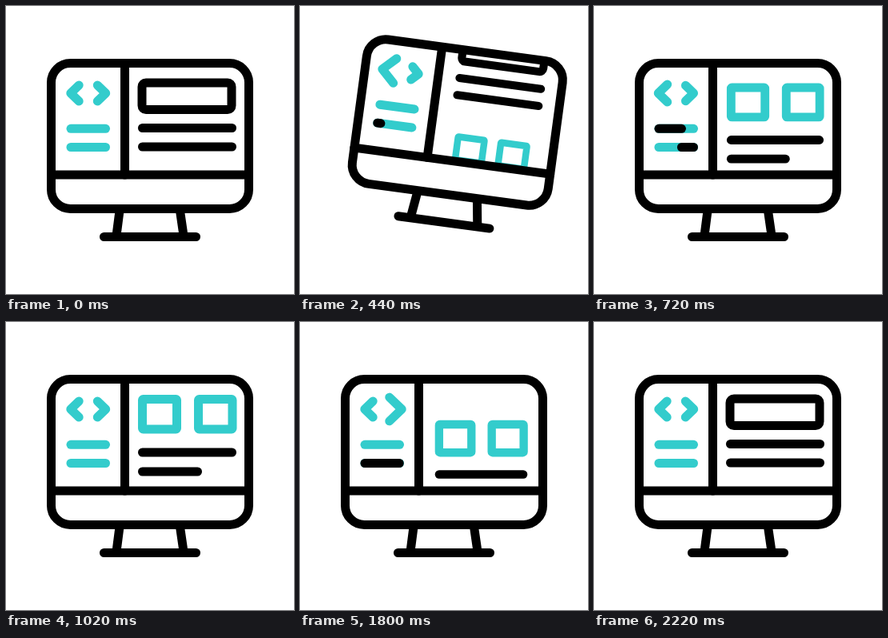
These frames come from a looping animation (360 px wide and 360 px high, 2.4 s). An HTML page with a canvas:

```html
<!DOCTYPE html>
<html lang="en">
<head>
<meta charset="utf-8">
<title>Web page monitor</title>
<style>
html, body { margin: 0; width: 100%; height: 100%; overflow: hidden; background: #fff; }
canvas { display: block; width: 100vmin; height: 100vmin; }
</style>
</head>
<body>
<canvas id="stage" width="360" height="360"></canvas>
<script>
const ctx = document.getElementById('stage').getContext('2d');
const LOOP = 2400, BLACK = '#000', TEAL = '#33cccc', STROKE = 11;
const SCROLL = 122, PAGE_X = 226.5, PAGE_Y = 113;

const span = (t, start, length) => Math.min(1, Math.max(0, (t - start) / length));
const ease = u => (1 - Math.cos(Math.PI * u)) / 2;
const bump = u => Math.sin(Math.PI * u) ** 2;

function line(color, ...points) {
  ctx.strokeStyle = color;
  ctx.beginPath();
  for (let i = 0; i < points.length; i += 2) ctx.lineTo(points[i], points[i + 1]);
  ctx.stroke();
}

function box(color, x, y, w, h, r) {
  ctx.strokeStyle = color;
  ctx.beginPath();
  ctx.roundRect(x, y, w, h, r);
  ctx.stroke();
}

// Head runs along the path for 200 ms, then the tail follows it.
function sweep(t, start, color, x1, y1, x2, y2) {
  if (t <= start || t >= start + 400) return;
  const tail = ease(span(t, start + 200, 200));
  const head = ease(span(t, start, 200));
  const dx = x2 - x1, dy = y2 - y1;
  line(color, x1 + dx * tail, y1 + dy * tail, x1 + dx * head, y1 + dy * head);
}

function bracket(x, dir, scale) {
  const w = 5.2 * scale * dir, h = 10 * scale;
  line(TEAL, x + w, 109 - h, x - w, 109, x + w, 109 + h);
}

function page(away, offset, incoming, draw) {
  if (away >= 1) return;
  const scale = 1 - away * (incoming ? 0.35 : 0.24);
  const grow = incoming ? Math.min(1, (1 - away) * 1.2) : 1;
  ctx.save();
  ctx.translate(PAGE_X, PAGE_Y + offset);
  ctx.scale(scale, scale);
  ctx.translate(-PAGE_X, -PAGE_Y);
  draw((y, length) => line(BLACK, 170.5, y, 170.5 + length * grow, y));
  ctx.restore();
}

function headerPage(rule) {
  box(BLACK, 170, 96, 112, 33.5, 5);
  rule(152.5, 112);
  rule(176, 112);
}

function cardsPage(rule) {
  box(TEAL, 170.5, 96.5, 43, 37.5, 1);
  box(TEAL, 240.5, 96.5, 42.5, 37.5, 1);
  rule(163, 112);
  rule(187, 69);
}

function content(t) {
  const back = t >= 1600;
  const q = back ? 1 - ease(span(t, 1600, 600)) : ease(span(t, 200, 600));
  ctx.save();
  ctx.beginPath();
  ctx.rect(148, 71, 156, 140);
  ctx.clip();
  page(q, -SCROLL * q, back, headerPage);
  page(1 - q, SCROLL * (1 - q), !back, cardsPage);
  ctx.restore();
}

function sidebar(t) {
  const first = bump(span(t, 200, 600)), second = bump(span(t, 1600, 600));
  bracket(86, 1, 1 + 0.6 * first);
  bracket(119.5, -1, 1 - 0.2 * first + 0.65 * second);
  for (const [y, delay] of [[153.3, 200], [176.5, 0]]) {
    line(TEAL, 81, y, 124.5, y);
    sweep(t, 400 + delay, BLACK, 81, y, 124.5, y);
    sweep(t, 1610 + delay, BLACK, 81, y, 124.5, y);
  }
}

function monitor() {
  box(BLACK, 56.5, 71.5, 247, 182, 24);
  line(BLACK, 56.5, 211, 303.5, 211);
  line(BLACK, 148.5, 72, 148.5, 211);
  line(BLACK, 142, 256, 138, 287);
  line(BLACK, 217.5, 256, 222, 287);
  line(BLACK, 122.5, 288.5, 237.5, 288.5);
}

function render(t) {
  ctx.fillStyle = '#fff';
  ctx.fillRect(0, 0, 360, 360);
  ctx.lineWidth = STROKE;
  ctx.lineCap = ctx.lineJoin = 'round';

  const hop = bump(span(t, 200, 400));
  ctx.save();
  ctx.translate(180, 288 - 20 * hop);
  ctx.rotate(8.5 * hop * Math.PI / 180);
  ctx.translate(-180, -288);
  content(t);
  sidebar(t);
  monitor();
  ctx.restore();

  sweep(t, 1810, TEAL, 300, 55, 304.5, 35.5);
  sweep(t, 1810, TEAL, 318.5, 67, 335, 57.5);
}

const begin = performance.now();
function tick() {
  // The motion advances in 20 ms steps.
  const t = (performance.now() - begin) % LOOP;
  render(Math.floor(t / 20) * 20);
  requestAnimationFrame(tick);
}
tick();
</script>
</body>
</html>
```
